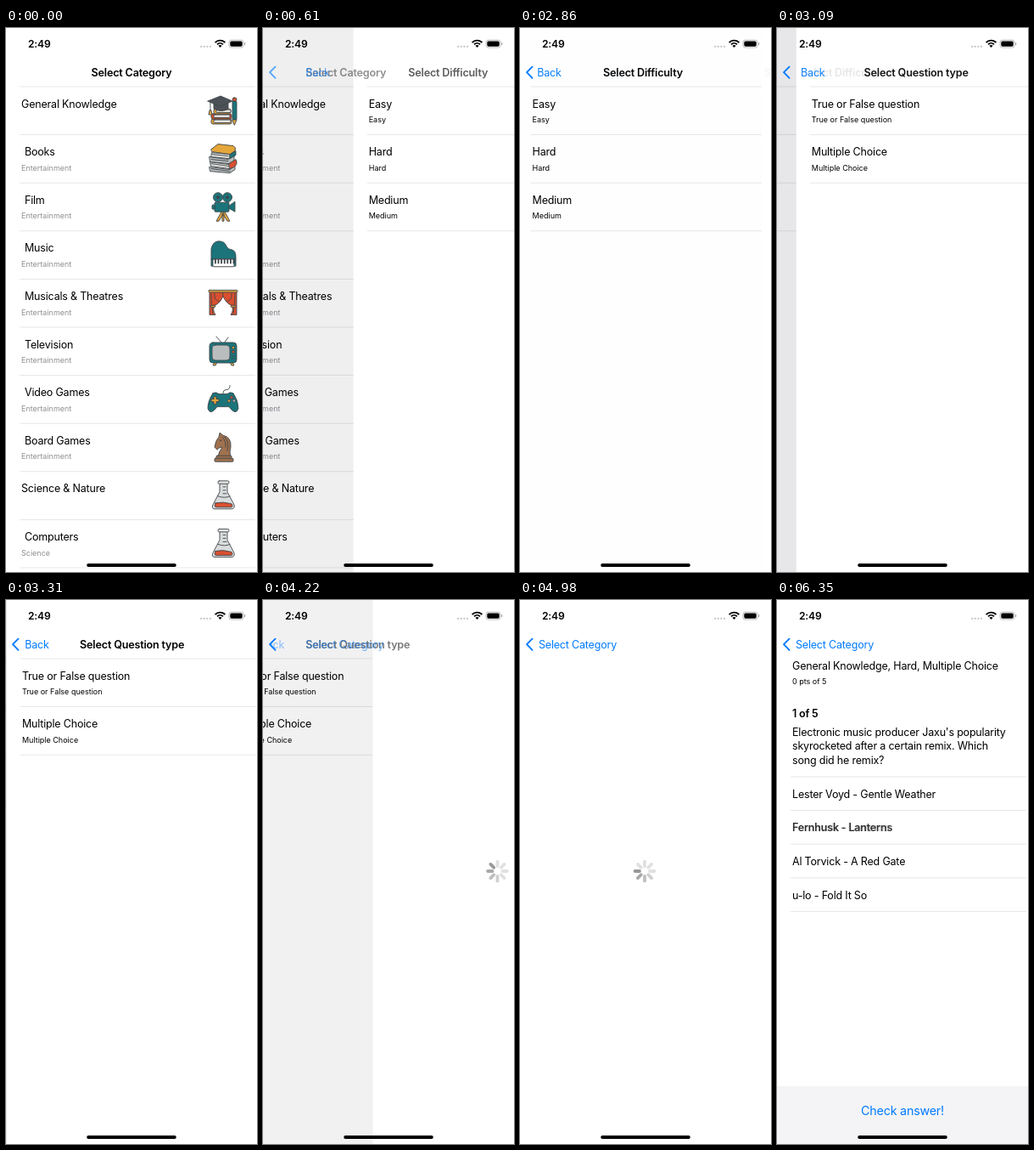
An HTML page with a canvas for the animation above (8 s loop, 296 by 640 pixels).

```html
<!DOCTYPE html>
<html lang="en">
<head>
<meta charset="utf-8">
<title>Quiz setup</title>
<style>
html, body { margin: 0; width: 100%; height: 100%; overflow: hidden; background: #fff; }
canvas { display: block; width: 296px; height: 640px; }
</style>
</head>
<body>
<canvas id="stage"></canvas>
<script>
const LOOP = 8000, W = 296, ROW = 56.6;
const BLUE = '#007aff', GRAY = '#8e8e93', INK = '#40474b';
const TEAL = '#1b747a', RED = '#d94f30', GOLD = '#e5a63a', PAPER = '#e3e2de', SILVER = '#b9bdbe';

const canvas = document.getElementById('stage');
const c = canvas.getContext('2d');
const dpr = window.devicePixelRatio || 1;
canvas.width = 296 * dpr;
canvas.height = 640 * dpr;

// The picture only changes at these moments (ms).
const ticks = [0, 500, 610, 720, 830, 950, 2860, 2980, 3090, 3200, 3310,
  4110, 4220, 4320, 4440, 4560, 4680, 4830, 4980, 6140, 6240, 6350];

const mix = (a, b, p) => a + (b - a) * p;
const clamp = v => Math.max(0, Math.min(1, v));

function spring(ms) {
  const s = Math.max(0, ms) * 0.017;
  const p = 1 - (1 + s) * Math.exp(-s);
  return p > 0.999 ? 1 : p;
}

function group(x, y, alpha, draw) {
  c.save();
  c.translate(x, y);
  c.globalAlpha *= alpha;
  draw();
  c.restore();
}

function setFont(size, weight) {
  c.font = `${weight} ${size}px Inter, "Liberation Sans", sans-serif`;
  c.letterSpacing = size > 10 ? `${-0.015 * size}px` : '0px';
}

// y is the middle of the capital letters
function text(s, x, y, { size = 12.5, color = '#000', weight = 400, alpha = 1 } = {}) {
  group(x, y, alpha, () => {
    setFont(size, weight);
    c.fillStyle = color;
    c.fillText(s, 0, size * 0.36);
  });
}

function centerX(s, size, weight) {
  setFont(size, weight);
  return 148 - c.measureText(s).width / 2;
}

function line(y) {
  c.fillStyle = '#e1e1e3';
  c.fillRect(16, y - 0.4, 278, 0.8);
}

function pill(x, y, w, h, r, color) {
  c.fillStyle = color;
  c.beginPath();
  c.roundRect(x, y, w, h, r);
  c.fill();
}

// Icon parts, drawn around the icon's centre
function paint(path, fill) {
  c.lineWidth = 0.9;
  c.lineJoin = c.lineCap = 'round';
  c.strokeStyle = INK;
  if (fill) { c.fillStyle = fill; c.fill(path); }
  c.stroke(path);
}
const shape = (d, fill) => paint(new Path2D(d), fill);
function box(x, y, w, h, fill, r = 1) {
  const p = new Path2D();
  p.roundRect(x, y, w, h, r);
  paint(p, fill);
}
function disc(x, y, r, fill) {
  const p = new Path2D();
  p.arc(x, y, r, 0, 7);
  paint(p, fill);
}

const icons = {
  knowledge() {
    box(-14, 10, 24, 6, GOLD, 2);
    box(-11, 11, 20, 3.5, PAPER);
    box(-14, 4, 24, 6, RED, 2);
    box(-11, 5, 19, 3.5, PAPER);
    box(-11, -2, 20, 6, GOLD, 2);
    box(-8, -1, 17, 3.5, PAPER);
    shape('M-11-9V-2Q-2 3 6-2V-9Z', '#4b5156');
    shape('M-18-11L-3-17L11-11L-3-5Z', '#4b5156');
    shape('M-15-10V0M-16 0L-17 5H-13L-14 0Z', GOLD);
    box(11, -11, 5, 22, TEAL);
    box(11, -15, 5, 4, RED, 2);
    shape('M11 11H16L13.5 17Z', GOLD);
  },
  books() {
    shape('M-16 10L8 13L14 8V13L8 17L-15 15Z', SILVER);
    shape('M-15 4L7 7L15 2V7L8 12L-14 9Z', PAPER);
    shape('M7 6L15 1Q18 6 13 10L8 12Z', RED);
    shape('M-16-2L6 1L13-4V2L7 6L-15 4Z', SILVER);
    shape('M-13-7L8-5L14-9V-4L7 0L-14-2Z', PAPER);
    shape('M8-5L15-9V-4L8 0Z', TEAL);
    shape('M-14-11L-6-17L12-15Q16-13 14-9L8-5L-13-8Z', GOLD);
    shape('M-13-5L6-3M-14 1L6 3M-14 6L7 9M-14 12L8 15');
  },
  film() {
    shape('M-2 6L-8 17H-5L0 9L5 17H8L2 6ZM-1 8V17H1V8Z', GOLD);
    box(-10, -5, 17, 11, TEAL);
    shape('M7-1L14-6V6L7 2Z', TEAL);
    disc(-6, -11, 5.5, TEAL);
    disc(5, -11, 5.5, TEAL);
    disc(-6, -11, 1.5, INK);
    disc(5, -11, 1.5, INK);
    box(-13, -2, 3, 5, TEAL);
  },
  piano() {
    shape('M-14 13V-7Q-12-16-5-16Q2-16 4-10Q6-6 10-6Q15-5 15 2V13Z', TEAL);
    box(-12, 5, 25, 9, '#fff');
    for (let x = -10; x < 12; x += 3.6) {
      c.fillStyle = INK;
      c.fillRect(x, 5, 1.8, 5.5);
    }
    shape('M-14 5H15');
  },
  stage() {
    for (const side of [-1, 1]) {
      c.save();
      c.scale(side, 1);
      shape('M0-13H16V14H9Q13 8 10 3Q3 0 0-8Z', RED);
      shape('M14-11Q14 2 12 13M10-11Q11-3 5-2');
      box(9, 3, 6, 2, GOLD);
      c.restore();
    }
    box(-17, -15, 34, 2.5, GOLD);
  },
  tv() {
    shape('M-1-9L-8-17M1-9L6-16');
    shape('M-10 13L-12 17H-9L-7 13ZM8 13L10 17H13L11 13Z', GOLD);
    box(-16, -10, 32, 24, TEAL, 4);
    box(-13, -7, 21, 18, SILVER, 4);
    disc(12, -4, 1.6, GOLD);
    disc(12, 1, 1.6, RED);
    shape('M10 6H14M10 9H14');
  },
  pad() {
    shape('M0-7Q0-11 4-11Q8-11 8-16');
    shape('M-12-7Q-8-9-5-6H5Q8-9 12-7Q18 2 18 11Q15 20 7 9H-7Q-15 20-18 11Q-18 2-12-7Z', TEAL);
    shape('M-11-3H-8V0H-5V3H-8V6H-11V3H-14V0H-11Z', GOLD);
    disc(10, -2, 1.7, RED);
    disc(7, 2, 1.7, GOLD);
    disc(13, 2, 1.7, SILVER);
  },
  knight() {
    shape('M-6 11Q-5 5-1 0Q-5 0-7 3L-10 0Q-9-8-5-12L-4-17L0-14Q10-12 9 0Q7 6 9 11Z', '#a0714e');
    shape('M2-12Q8-6 5 4M-1-12Q4-7 3 0');
    disc(-3, -8, 0.6, INK);
    box(-8, 10, 18, 3.5, '#a0714e');
    box(-10, 13, 22, 4, '#a0714e');
  },
  flask() {
    shape('M-4-14V-4L-12 11Q-14 16-10 16H10Q14 16 13 11L5-4V-14Z', '#d9dcdc');
    shape('M-9 9Q0 7 10 10L11 12Q11 14 9 14H-8Q-11 14-9 9Z', RED);
    shape('M-6 1Q2 4 8 1');
    box(-6, -17, 13, 3.5, PAPER, 1.5);
    shape('M0-10H3M0-6H3M0-2H4');
  }
};

const categories = [
  ['General Knowledge', '', 'knowledge'],
  ['Books', 'Entertainment', 'books'],
  ['Film', 'Entertainment', 'film'],
  ['Music', 'Entertainment', 'piano'],
  ['Musicals & Theatres', 'Entertainment', 'stage'],
  ['Television', 'Entertainment', 'tv'],
  ['Video Games', 'Entertainment', 'pad'],
  ['Board Games', 'Entertainment', 'knight'],
  ['Science & Nature', '', 'flask'],
  ['Computers', 'Science', 'flask']
];

function categoryList() {
  line(69);
  categories.forEach(([name, kind, icon], i) => {
    const y = 89 + ROW * i;
    text(name, kind ? 22 : 18, y);
    text(kind, 18, y + 19, { size: 9, color: GRAY });
    line(y + 36.6);
    group(256, y + 8, 1, icons[icon]);
  });
}

function optionList(items) {
  line(69);
  items.forEach(([name, note], i) => {
    const y = 89 + ROW * i;
    text(name, 18, y);
    text(note, 18, y + 19, { size: 9 });
    line(y + 36.6);
  });
}

function spinner(t) {
  const head = 7 + Math.floor((t - 4220) / 108);
  const tones = ['#98989a', '#a9a9ab', '#bebec0', '#d0d0d2'];
  for (let i = 0; i < 8; i++) {
    const lag = ((head - i) % 8 + 8) % 8;
    c.save();
    c.translate(147, 319);
    c.rotate(i * Math.PI / 4);
    pill(-1.9, -13.3, 3.8, 9.2, 1.9, tones[lag] || '#e0e0e2');
    c.restore();
  }
}

const answers = ['Lester Voyd - Gentle Weather', 'Fernhusk - Lanterns',
  'Al Torvick - A Red Gate', 'u-lo - Fold It So'];

function quiz(t) {
  text('General Knowledge, Hard, Multiple Choice', 18, 77);
  text('0 pts of 5', 18, 96, { size: 9 });
  text('1 of 5', 18, 133, { weight: 600 });
  ["Electronic music producer Jaxu's popularity",
    'skyrocketed after a certain remix. Which',
    'song did he remix?'].forEach((s, i) => text(s, 18, 155 + 16.6 * i));
  line(208);
  answers.forEach((s, i) => {
    const y = 228 + 39.7 * i;
    const picked = i === 1 ? clamp((t - 6140) / 260) : 0;
    text(s, 18, y, { alpha: 1 - picked });
    text(s, 18, y, { weight: 600, alpha: picked });
    line(y + 19.5);
  });
  c.fillStyle = '#f4f4f6';
  c.fillRect(0, 572, 296, 68);
  const label = 'Check answer!';
  text(label, centerX(label, 14.3, 400), 600.5, { size: 14.3, color: BLUE });
}

function game(t) {
  const shown = clamp((t - 6090) / 150);
  group(0, 0, 1 - shown, () => spinner(t));
  group(0, 0, shown, () => quiz(t));
}

const pages = [
  { start: -LOOP, title: 'Select Category', back: '', draw: categoryList },
  { start: 482, title: 'Select Difficulty', back: 'Back',
    draw: () => optionList(['Easy', 'Hard', 'Medium'].map(s => [s, s])) },
  { start: 2842, title: 'Select Question type', back: 'Back',
    draw: () => optionList([['True or False question', 'True or False question'],
      ['Multiple Choice', 'Multiple Choice']]) },
  { start: 4109, title: '', back: 'Select Category', draw: game }
];

function showPage(page, x, t) {
  group(x, 0, 1, () => {
    c.fillStyle = '#fff';
    c.fillRect(0, 0, 300, 640);
    page.draw(t);
  });
}

function navBar(prev, cur, p) {
  const bold = { size: 12.6, weight: 600 };
  const titleX = page => centerX(page.title, bold.size, bold.weight);
  if (prev) {
    text(prev.title, mix(titleX(prev), 22, p), 52, { ...bold, alpha: 1 - p ** 1.3 });
    // The leaving label slips behind the chevron
    group(0, 0, 1 - p, () => {
      c.beginPath();
      c.rect(10, 40, W, 25);
      c.clip();
      text(prev.back, 22 - 45 * p, 52, { color: BLUE });
    });
    text(cur.back, mix(titleX(prev), 22, p), 52, { color: BLUE, alpha: p });
    group(0, 0, prev.back ? 1 : p, () => {
      c.strokeStyle = BLUE;
      c.lineWidth = 1.9;
      c.lineCap = c.lineJoin = 'round';
      c.stroke(new Path2D('M14.5 45.7L8 52.2L14.5 58.8'));
    });
  }
  text(cur.title, mix(W, titleX(cur), p), 52, { ...bold, alpha: p });
}

function statusBar() {
  text('2:49', 26, 18.5, { size: 12.1, weight: 600 });
  for (let i = 0; i < 4; i++) pill(229 + 3.6 * i, 20.7, 2.3, 2.3, 1.15, '#c4c4c6');
  c.strokeStyle = '#000';
  c.lineCap = 'butt';
  c.lineWidth = 1.9;
  for (const r of [4.7, 8]) {
    c.beginPath();
    c.arc(252.5, 22.6, r, -Math.PI * 0.76, -Math.PI * 0.24);
    c.stroke();
  }
  c.fillStyle = '#000';
  c.fill(new Path2D('M252.5 23L250.4 20.8Q252.5 19.2 254.6 20.8Z'));
  c.strokeStyle = '#aaa';
  c.lineWidth = 0.8;
  c.beginPath();
  c.roundRect(263, 14.2, 17, 8.8, 2.6);
  c.stroke();
  pill(264.3, 15.5, 14.4, 6.2, 1.6, '#000');
  pill(281, 17, 1.2, 3.2, 0.6, '#aaa');
  pill(95.2, 629.9, 105.6, 4.1, 2, '#000');
}

function render(time) {
  const t = ticks.filter(k => k <= time).pop();
  const i = pages.filter(page => page.start <= t).length - 1;
  const cur = pages[i], prev = pages[i - 1];
  const p = spring(t - cur.start);

  c.setTransform(dpr, 0, 0, dpr, 0, 0);
  if (p < 1) {
    showPage(prev, -0.3 * W * p, t);
    c.fillStyle = `rgba(0, 0, 30, ${0.1 * p})`;
    c.fillRect(0, 0, 296, 640);
  }
  showPage(cur, W * (1 - p), t);
  navBar(prev, cur, p);
  statusBar();
}

const begin = performance.now();
function frame() {
  render((performance.now() - begin) % LOOP);
  requestAnimationFrame(frame);
}
frame();
</script>
</body>
</html>
```
